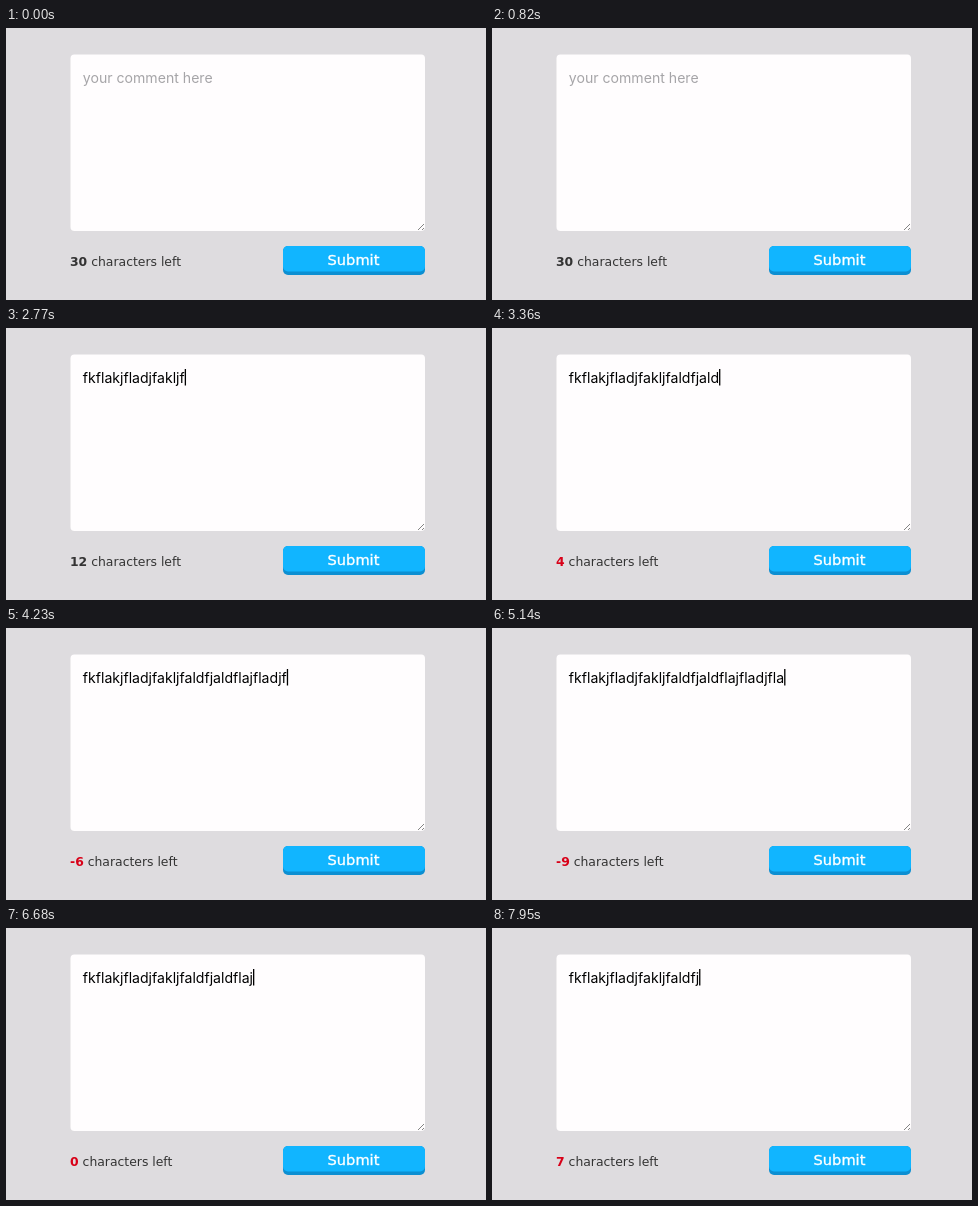
Animation, 480 px wide and 272 px high, one loop 8000 ms. Source, as an HTML page:

```html
<!DOCTYPE html>
<html lang="en">
<head>
<meta charset="utf-8">
<title>Character counter</title>
<style>
  html, body { margin: 0; width: 100%; height: 100%; overflow: hidden; background: #dedcdf; }
  svg { display: block; width: 480px; height: 272px; }
  #comment { font: 14.1px Inter, sans-serif; }
  #counter { font: 12.4px "DejaVu Sans", sans-serif; fill: #333; }
  #left { font-weight: bold; }
  #submit { font: 14.6px "DejaVu Sans", sans-serif; fill: #fff; stroke: #fff; stroke-width: .35px; }
</style>
</head>
<body>
<svg viewBox="0 0 480 272">
  <rect width="480" height="272" fill="#dedcdf"/>
  <rect x="64.5" y="26.5" width="354.5" height="176.5" rx="4" fill="#fffdfe"/>
  <path d="M412 202L418 196M416 202L418 200" stroke="#777" stroke-width=".9"/>
  <text id="comment" x="76.8" y="54.8"></text>
  <rect id="caret" y="41" width="1.3" height="16.5"/>
  <text id="counter" x="64" y="237.8"><tspan id="left">30</tspan> characters left</text>
  <rect x="277" y="218" width="142" height="29" rx="5" fill="#0c8fd2"/>
  <rect x="277" y="218" width="142" height="25.5" rx="5" fill="#11b5ff"/>
  <text id="submit" x="347.5" y="237" text-anchor="middle">Submit</text>
</svg>
<script>
const LOOP = 8000, LIMIT = 30, WARN_BELOW = 10;
const TEXT = "fkflakjfladjfakljfaldfjaldflajfladjflaj";
const [comment, caret, left] = ["comment", "caret", "left"].map(id => document.getElementById(id));

// Each burst of key presses: first press, interval, number of keys, change in length
const bursts = [
  { start: 1640, every: 64, keys: 18, step: 1 },
  { start: 2802, every: 74, keys: 8, step: 1 },
  { start: 3405, every: 85, keys: 13, step: 1 },
  { start: 5120, every: 184, keys: 16, step: -1 }
];
const presses = bursts.flatMap(b =>
  Array.from({ length: b.keys }, (_, i) => ({ at: b.start + i * b.every, step: b.step })));

// The counter reacts on key release, slightly after the text
const lengthAt = (t, typeLag = 0, eraseLag = 0) => presses.reduce((n, p) =>
  t >= p.at + (p.step > 0 ? typeLag : eraseLag) ? n + p.step : n, 0);

function caretVisible(t) {
  const last = presses.filter(p => p.at <= t).pop();
  const since = t - (last ? last.at : 250);
  return since >= 0 && since % 1000 < 500;
}

function draw(t) {
  const length = lengthAt(t);
  comment.textContent = length ? TEXT.slice(0, length) : "your comment here";
  comment.setAttribute("fill", length ? "#000" : "#a6a5a8");
  const width = length ? comment.getComputedTextLength() : 0;
  caret.setAttribute("x", 76.8 + width);
  caret.style.visibility = caretVisible(t) ? "visible" : "hidden";

  const remaining = LIMIT - lengthAt(t, 25, 45);
  left.textContent = remaining;
  left.setAttribute("fill", remaining < WARN_BELOW ? "#d80018" : "#333");
}

function frame() {
  draw(performance.now() % LOOP);
  requestAnimationFrame(frame);
}
frame();
</script>
</body>
</html>
```
